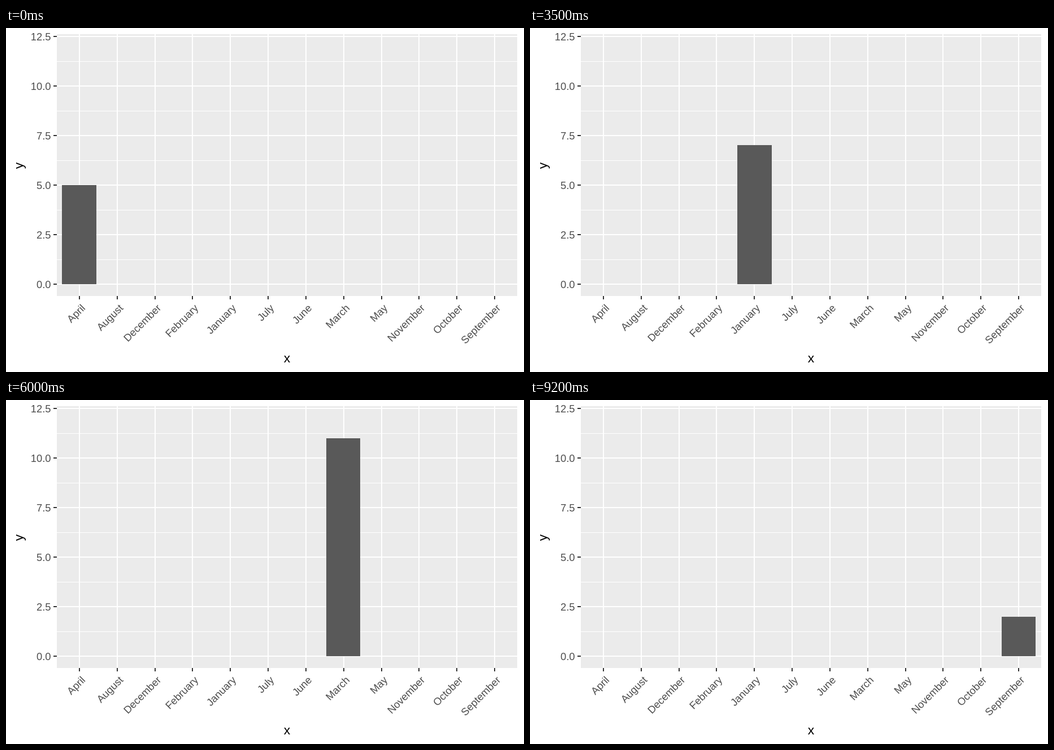
Recreate the animation shown at these times as an HTML page. Size 917 px wide and 611 px high, loop 10 s.

```html
<!DOCTYPE html>
<html lang="en">
<head>
<meta charset="utf-8">
<title>Monthly bars</title>
<style>
  html, body { margin: 0; width: 100%; height: 100%; overflow: hidden; background: #fff; }
  svg { display: block; width: 917px; height: 611px; }
  text { font-family: "Liberation Sans", Arial, sans-serif; font-size: 18.33px; fill: #4d4d4d; }
  .title { font-size: 22.92px; fill: #000; text-anchor: middle; }
  .label { text-anchor: end; }
  rect { shape-rendering: crispEdges; }
</style>
</head>
<body>
<svg id="chart" viewBox="0 0 917 611"></svg>
<script>
  const LOOP = 10000;
  // month, value, time at which its bar appears
  const STEPS = [
    ["April", 5, 0],
    ["August", 9, 800],
    ["December", 4, 1700],
    ["February", 3, 2600],
    ["January", 7.01, 3500],
    ["July", 10, 4400],
    ["June", 1, 5200],
    ["March", 11, 6000],
    ["May", 8, 6800],
    ["November", 12, 7600],
    ["October", 6, 8400],
    ["September", 2, 9200]
  ];
  const PANEL = { left: 90, top: 11, right: 905, bottom: 476 };
  const BASE = 455;
  const chart = document.getElementById("chart");

  const yOf = v => Math.round(BASE - 35.2 * v);
  const xOf = i => Math.round(129.85 + 66.84 * i);

  function add(tag, attrs, content = "") {
    const el = document.createElementNS("http://www.w3.org/2000/svg", tag);
    for (const key in attrs) el.setAttribute(key, attrs[key]);
    el.textContent = content;
    chart.appendChild(el);
    return el;
  }

  const box = (x, y, width, height, fill) => add("rect", { x, y, width, height, fill });
  const label = (x, y, content, cls, angle = 0) =>
    add("text", { class: cls, transform: `translate(${x} ${y}) rotate(${angle})` }, content);

  const panelWidth = PANEL.right - PANEL.left;
  const panelHeight = PANEL.bottom - PANEL.top;
  box(PANEL.left, PANEL.top, panelWidth, panelHeight, "#ebebeb");

  for (let v = 1.25; v < 12.5; v += 2.5) box(PANEL.left, yOf(v), panelWidth, 1, "#fff");

  for (let v = 0; v <= 12.5; v += 2.5) {
    const y = yOf(v);
    box(PANEL.left, y - 1, panelWidth, 2, "#fff");
    box(PANEL.left - 6, y - 1, 6, 2, "#333");
    label(79.5, y + 7, v.toFixed(1), "label");
  }

  STEPS.forEach(([month], i) => {
    const x = xOf(i);
    box(x - 1, PANEL.top, 2, panelHeight, "#fff");
    box(x - 1, PANEL.bottom, 2, 6, "#333");
    label(x + 11.5, 498.5, month, "label", -45);
  });

  label(497.5, 594, "x", "title");
  label(30, 244.5, "y", "title", -90);

  const bars = STEPS.map(([, value], i) => {
    const top = yOf(value);
    return box(Math.round(99.4 + 66.86 * i), top, i < 5 ? 61 : 60, BASE - top, "#595959");
  });

  function draw(time) {
    const t = time % LOOP;
    const active = STEPS.filter(step => step[2] <= t).length - 1;
    bars.forEach((bar, i) => bar.setAttribute("visibility", i === active ? "visible" : "hidden"));
  }

  const start = performance.now();
  function tick() {
    draw(performance.now() - start);
    requestAnimationFrame(tick);
  }
  draw(0);
  requestAnimationFrame(tick);
</script>
</body>
</html>
```
